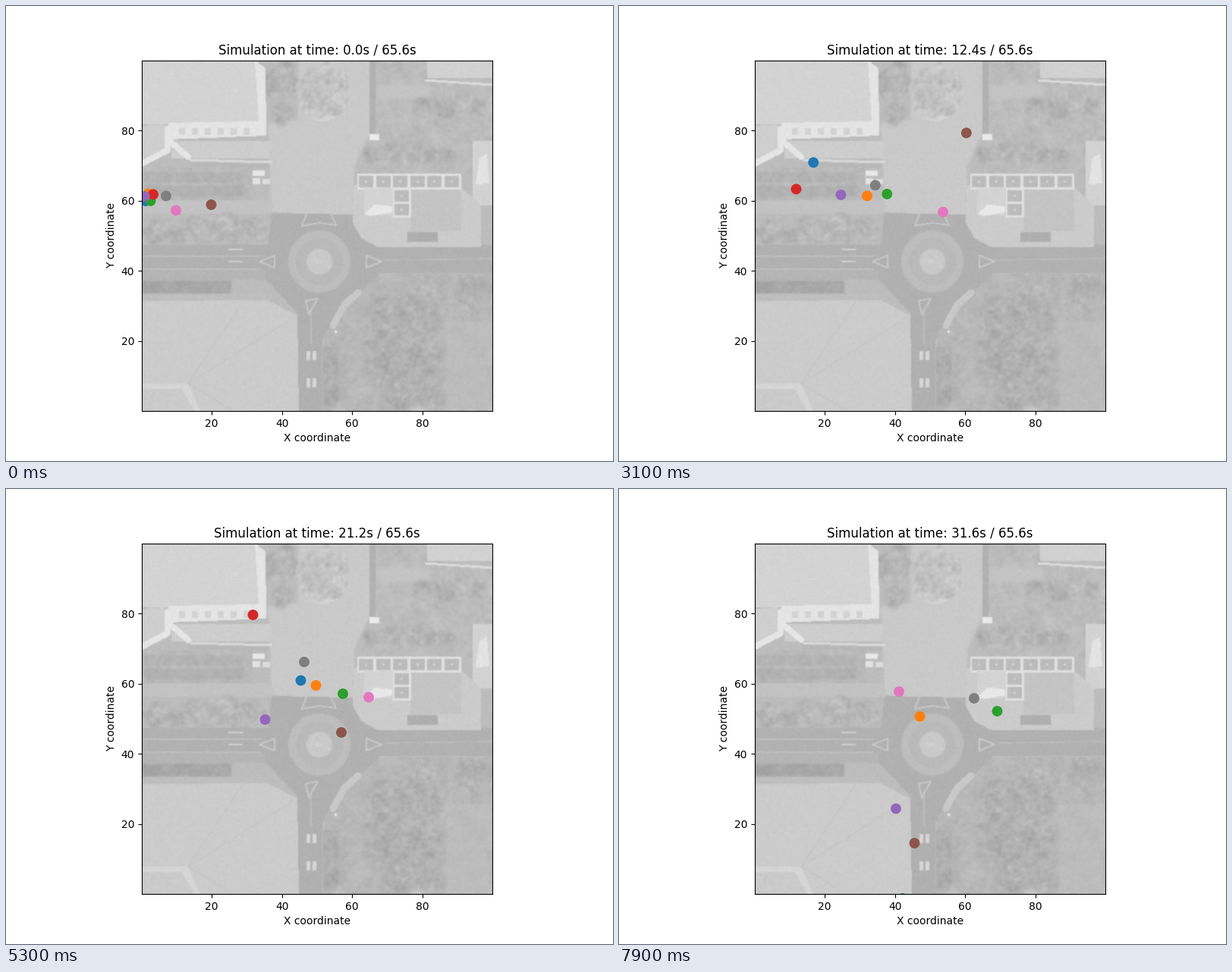
These frames come from a looping animation (800x600 px, 8000 ms). A matplotlib script:

```python
import numpy as np
import matplotlib.pyplot as plt
from matplotlib.animation import FuncAnimation
from matplotlib.path import Path

LEFT, TOP, SIDE = 179, 72, 462      # plot area in pixels
LOW, HIGH = 0.1, 99.9               # axis limits
FRAMES, INTERVAL = 80, 100
STEP, TOTAL = 0.4, 65.6             # simulated seconds

rng = np.random.default_rng(4)
row, col = np.mgrid[0:SIDE, 0:SIDE]
X, Y = col + LEFT + 0.5, row + TOP + 0.5
PIXELS = np.column_stack([X.ravel(), Y.ravel()])


def blur(a, sigma):
    n = int(3 * sigma) + 1
    k = np.exp(-0.5 * (np.arange(-n, n + 1) / sigma) ** 2)
    k /= k.sum()
    for axis in (0, 1):
        pad = [(n, n) if i == axis else (0, 0) for i in (0, 1)]
        wide = np.pad(a, pad, mode="edge")
        a = np.apply_along_axis(np.convolve, axis, wide, k, mode="valid")
    return a


def noise(sigma):
    a = blur(rng.standard_normal((SIDE, SIDE)), sigma)
    return a / a.std()


GRAIN, LEAVES, EDGE = noise(1), noise(1.8) + noise(6), noise(4)
img = np.full((SIDE, SIDE), 188.0)


def fill(mask, tone, rough=0, soft=0):
    weight = blur(mask.astype(float), soft) if soft else mask
    img[:] += weight * (tone + rough * LEAVES - img)


def box(tone, x0, y0, x1, y1, **look):
    fill((X >= x0) & (X < x1) & (Y >= y0) & (Y < y1), tone, **look)


def poly(tone, *pts, **look):
    mask = Path(pts).contains_points(PIXELS).reshape(SIDE, SIDE)
    fill(mask, tone, **look)


def disc(tone, x, y, r, ragged=0, **look):
    d = np.hypot(X - x, Y - y) / r
    fill(d + ragged * EDGE < 1, tone, **look)


def line(tone, width, *pts):
    for (x0, y0), (x1, y1) in zip(pts, pts[1:]):
        dx, dy = x1 - x0, y1 - y0
        t = np.clip(((X - x0) * dx + (Y - y0) * dy) / (dx * dx + dy * dy), 0, 1)
        fill(np.hypot(X - x0 - t * dx, Y - y0 - t * dy) < width / 2, tone)


def grove(tone, x0, y0, x1, y1, r, rough=4):
    """Random tree crowns that together cover a rectangle."""
    crowns = np.zeros((SIDE, SIDE), bool)
    for _ in range(int(1.5 * (x1 - x0) * (y1 - y0) / r ** 2)):
        x, y = rng.uniform((x0, y0), (x1, y1))
        crowns |= np.hypot(X - x, Y - y) / r + 0.15 * EDGE < 1
    fill(crowns, tone, rough, soft=2)


def draw_plaza():
    poly(201, (345, 155), (385, 150), (385, 72), (480, 72), (483, 160),
         (459, 212), (458, 280), (350, 272), soft=1.5)
    grove(179, 350, 82, 372, 155, 14)
    disc(211, 417, 125, 27)
    disc(194, 417, 115, 34, ragged=0.14, rough=5, soft=1)


def draw_hall():
    box(212, 179, 72, 333, 156)
    fill((X < 333) & (Y < 156) & (Y % 4 < 2), 210)
    poly(228, (328, 72), (342, 82), (343, 171), (214, 176), (214, 154),
         (333, 152))
    for x in range(228, 330, 17):
        box(210, x, 161, x + 8, 170)
    box(205, 218, 178, 348, 201)
    poly(206, (179, 158), (210, 156), (214, 196), (179, 206))
    line(229, 8, (213, 162), (213, 190), (179, 208))
    line(229, 8, (213, 176), (240, 199))
    line(218, 3, (243, 203), (350, 206))
    line(183, 5, (243, 209), (345, 211))


def draw_left_yards():
    box(185, 179, 213, 324, 256, rough=2)
    for y in (219, 237):
        box(178, 182, y, 312, y + 14, rough=2, soft=1)
    box(194, 179, 256, 350, 274)
    grove(180, 190, 286, 340, 304, 13)
    box(231, 325, 217, 341, 224)
    box(226, 325, 227, 335, 235)
    box(220, 338, 228, 348, 235)


def draw_roads():
    cx, cy = 413, 337
    box(177, 179, 315, 641, 352)
    box(181, 179, 348, 345, 361)
    box(167, 180, 362, 297, 379, rough=2, soft=1)
    box(190, 179, 380, 345, 389)
    poly(176, (350, 273), (457, 275), (492, 318), (492, 355), (437, 405),
         (417, 440), (417, 534), (385, 534), (384, 405), (342, 360),
         (345, 315))
    for r, tone in ((41, 189), (31, 185), (17, 201)):
        disc(tone, cx, cy, r, soft=0.8)
    disc(206, cx, cy, 12, ragged=0.3, rough=3)
    for y in (330, 347):
        line(190, 1.5, (179, y), (335, y))
    line(188, 1.5, (500, 335), (641, 333))
    line(190, 1.5, (402, 405), (402, 445))
    # traffic islands: an arrowhead pointing away along each arm
    for ux, uy, near in ((1, 0, 62), (-1, 0, 59), (-0.2, 1, 50)):
        mx, my = cx + near * ux, cy + near * uy
        a, b = (mx - 8 * uy, my - 8 * ux), (mx + 8 * uy, my + 8 * ux)
        line(202, 1.8, a, b, (mx + 20 * ux, my + 20 * uy), a)
    line(202, 1.8, (399, 266), (390, 290), (413, 286), (435, 289), (424, 266))
    for y in (321, 337):
        line(210, 2, (294, y), (311, y))
    for y in (461, 497):
        for x in (396, 404):
            box(214, x, y - 6, x + 5, y + 6)


def draw_garden():
    box(188, 487, 72, 641, 222, rough=2)
    box(196, 489, 104, 560, 122, soft=2)
    box(177, 479, 72, 487, 168)
    grove(181, 495, 132, 630, 136, 13)
    grove(182, 475, 190, 580, 200, 14)
    box(209, 555, 72, 641, 95)
    line(220, 3, (553, 98), (641, 104))
    box(234, 479, 169, 492, 177)
    box(210, 615, 178, 641, 263)
    poly(227, (624, 200), (634, 195), (637, 234), (619, 235))


def draw_pavilion():
    poly(203, (458, 236), (600, 240), (626, 262), (626, 318), (490, 318),
         (468, 306), (457, 285))
    box(196, 533, 242, 600, 297)
    box(174, 529, 298, 569, 311)
    box(224, 463, 221, 600, 242)
    box(224, 509, 240, 534, 279)
    cells = [(465 + 22.6 * i, 224) for i in range(6)]
    for x, y in cells + [(512, 243), (512, 261)]:
        box(187, x, y, x + 19, y + 15)
        box(210, x + 8, y + 6, x + 11, y + 9)
    box(211, 472, 240, 510, 276)
    poly(232, (472, 274), (486, 262), (509, 264), (509, 272), (480, 277))


def draw_barn():
    hub = (240, 498)
    poly(203, (179, 389), (345, 388), (384, 408), (386, 534), (179, 534))
    for end in ((313, 388), (384, 408), (300, 534)):
        line(197, 1.5, hub, end)
    poly(213, (179, 498), hub, (256, 534), (179, 534))
    poly(202, (179, 505), (232, 505), (248, 534), (179, 534))


def draw_woods():
    poly(182, (520, 353), (641, 353), (641, 534), (418, 534), (420, 432),
         (490, 357), rough=2)
    line(200, 9, (464, 378), (446, 394), (431, 421))
    box(176, 418, 450, 438, 534, rough=3)
    box(188, 580, 415, 641, 534, rough=1, soft=2)
    grove(179, 600, 372, 630, 395, 18)
    grove(176, 488, 385, 555, 520, 24)
    box(236, 433, 428, 436, 431)


for draw in (draw_plaza, draw_hall, draw_left_yards, draw_roads,
             draw_garden, draw_pavilion, draw_barn, draw_woods):
    draw()
img = blur(img, 0.8) + GRAIN

fig, ax = plt.subplots(figsize=(8, 6), dpi=100)
ticks = range(20, 100, 20)
ax.imshow(img, cmap="gray", vmin=0, vmax=255, extent=(LOW, HIGH, LOW, HIGH))
ax.set(xlabel="X coordinate", ylabel="Y coordinate", xticks=ticks,
       yticks=ticks, xlim=(LOW, HIGH), ylim=(LOW, HIGH))
title = ax.set_title("")

# Each walker passes smoothly through a few pixel waypoints at shared steps.
KEYS = np.array([0, 14, 24, 38, 53, 70, 79])
walkers = []


def walker(*points):
    x, y = np.array(points, float).T
    unit = (HIGH - LOW) / SIDE
    walkers.append(np.column_stack([LOW + (x - LEFT) * unit,
                                    HIGH - (y - TOP) * unit]))


walker((184, 257), (205, 246), (230, 229), (290, 193), (388.5, 252.5),
       (372, 431), (373.5, 540))
walker((187.5, 247.5), (237.5, 252), (295, 246), (355, 256.5), (408.5, 259),
       (430.5, 289), (396.5, 300))
walker((190.5, 257), (243, 259.5), (313, 254), (387.5, 245.5), (444, 270),
       (495, 282.5), (498.5, 293))
walker((194, 248.5), (209, 248), (214, 244), (260.5, 232), (325.5, 166),
       (335, 62), (337, 5))
walker((182.5, 251), (219, 254.5), (264, 250.5), (316, 254), (341.5, 304),
       (359.5, 373), (365, 421.5))
walker((270.5, 262), (365.5, 182.5), (409.5, 133), (493.5, 225), (442, 321),
       (384.5, 396.5), (389.5, 467))
walker((224, 269.5), (338, 265.5), (404.5, 271), (441, 271.5), (478, 274.5),
       (459.5, 277), (369, 267))
walker((211, 250.5), (262, 248), (319, 240.5), (350.5, 233), (393, 228),
       (439, 270.5), (468, 276))

POS = np.stack(walkers, axis=1)
VEL = np.gradient(POS, KEYS, axis=0)
dots = ax.scatter(*POS[0].T, s=100, lw=0, zorder=2,
                  c=[f"C{i}" for i in range(len(walkers))])


def locate(i):
    """Cubic Hermite positions of all walkers at step i."""
    k = min(np.searchsorted(KEYS, i, side="right") - 1, len(KEYS) - 2)
    h = KEYS[k + 1] - KEYS[k]
    s = (i - KEYS[k]) / h
    rise = s * s * (3 - 2 * s)
    return (POS[k] * (1 - rise) + POS[k + 1] * rise
            + h * s * (1 - s) * ((1 - s) * VEL[k] - s * VEL[k + 1]))


def update(i):
    title.set_text(f"Simulation at time: {i * STEP:.1f}s / {TOTAL}s")
    dots.set_offsets(locate(i))
    return title, dots


anim = FuncAnimation(fig, update, frames=FRAMES, interval=INTERVAL,
                     repeat=True, repeat_delay=0)
plt.show()
```
